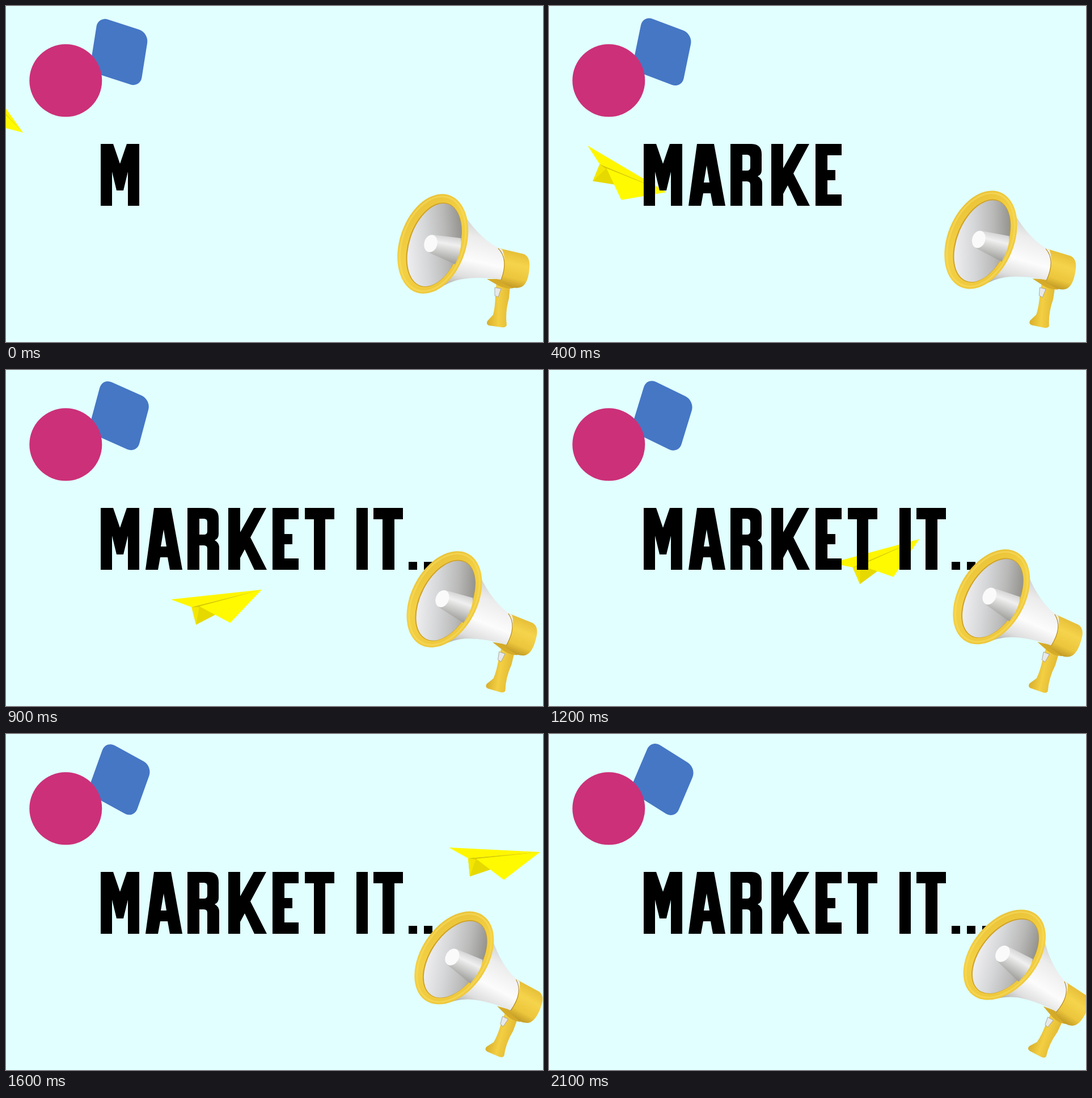
Animation, 947 px wide and 592 px high, one loop 2200 ms. Source, as an HTML page:

```html
<!DOCTYPE html>
<html lang="en">
<head>
<meta charset="utf-8">
<title>Market it...</title>
<style>
html, body { margin: 0; height: 100%; overflow: hidden; background: #e1ffff; }
svg { display: block; width: 100vw; height: 100vh; }
</style>
</head>
<body>
<svg viewBox="0 0 947 592">
  <defs>
    <linearGradient id="rim" x1="0" y1="0" x2="1" y2="1">
      <stop offset="0" stop-color="#e6bd33"/><stop offset=".45" stop-color="#f4d144"/><stop offset="1" stop-color="#ecc539"/>
    </linearGradient>
    <linearGradient id="bowl" x1=".1" y1=".8" x2=".9" y2=".2">
      <stop offset="0" stop-color="#eeeef1"/><stop offset=".35" stop-color="#d6d7d9"/><stop offset=".7" stop-color="#b9b9b8"/><stop offset="1" stop-color="#94938f"/>
    </linearGradient>
    <linearGradient id="tube" x1=".6" y1="0" x2=".4" y2="1">
      <stop offset="0" stop-color="#cecece"/><stop offset=".3" stop-color="#f0f0f0"/><stop offset=".65" stop-color="#c2c2c0"/><stop offset="1" stop-color="#92918d"/>
    </linearGradient>
    <linearGradient id="horn" x1=".6" y1="0" x2=".4" y2="1">
      <stop offset="0" stop-color="#c6c7c6"/><stop offset=".3" stop-color="#ececec"/><stop offset=".6" stop-color="#fcfcfc"/><stop offset=".82" stop-color="#dedede"/><stop offset="1" stop-color="#a9a9a6"/>
    </linearGradient>
    <linearGradient id="can" x1=".6" y1="0" x2=".4" y2="1">
      <stop offset="0" stop-color="#e2b730"/><stop offset=".4" stop-color="#f5d44c"/><stop offset=".75" stop-color="#ecc63c"/><stop offset="1" stop-color="#bd9522"/>
    </linearGradient>
    <linearGradient id="grip">
      <stop offset="0" stop-color="#d8ae2b"/><stop offset=".5" stop-color="#f3cf43"/><stop offset="1" stop-color="#e2ba33"/>
    </linearGradient>
  </defs>

  <rect id="tile" x="-46.5" y="-49" width="93" height="98" rx="18" fill="#4577c5"/>
  <circle cx="105.3" cy="131.3" r="64" fill="#cc3079"/>

  <!-- paper plane, nose at the origin -->
  <g id="plane">
    <path d="M-127 11-124 43-94 33 0 0z" fill="#e6d900"/>
    <path d="M-127 11-124 43-113 11z" fill="#f3e700"/>
    <path d="M-161-8 0 0-127 11z" fill="#fff600"/>
    <path d="M-127 11 0 0-113 13z" fill="#d9cb00"/>
    <path d="M-113 12 0 0-64 49z" fill="#fffa00"/>
  </g>

  <!-- condensed display lettering -->
  <g id="word" role="img" aria-label="MARKET IT..." fill-rule="evenodd">
    <path d="M167 352V243h22l12 35 12-35h22v109h-20V292l-8 33h-12l-8-33v60z"/>
    <path d="M246 352 261 243h30l20 109h-22l-4-22h-13l-4 22zM278 281l-5 30h10z"/>
    <path d="M320 243h36q19 0 19 18v28q0 8-7 11 8 4 8 13v39h-21v-37q0-6-6-6h-8v43h-21zM341 262v28h8q6 0 6-6v-16q0-6-6-6z"/>
    <path d="M392 243h21v43l24-43h22l-28 52 29 57h-22l-17-36-8 15v21h-21z"/>
    <path d="M470 243h46v20h-25v26h14v18h-14v25h25v20h-46z"/>
    <path d="M527 243h52v20h-16v89h-20v-89h-16z"/>
    <path d="M618 243h20v109h-20z"/>
    <path d="M648 243h52v20h-15v89h-21v-89h-16z"/>
    <path d="M710 338h15v14h-15z"/>
    <path d="M737 338h15v14h-15z"/>
    <path d="M764 338h15v14h-15z"/>
  </g>

  <g id="horn-group">
    <path d="M865 488 889 492 887 515Q880 540 883 562 882 567 874 566L852 563Q846 561 849 555L859 544Q863 530 863 505z" fill="url(#grip)"/>
    <path d="M862 496 873 498 868 513 862 510z" fill="#e8e8e8" stroke="#9c9c98" stroke-width=".8"/>
    <path d="M848 481 870 481 897 489 895 497Q880 500 862 489z" fill="#d6ab29"/>
    <path d="M866 426 913 437Q925 442 923 462 921 489 909 495 902 498 893 496L866 484z" fill="url(#can)"/>
    <path d="M806 365Q838 414 875 429 884 450 873 482 831 476 800 482 780 486 757 502z" fill="url(#horn)"/>
    <path d="M868 427Q887 446 873 483" fill="none" stroke="#b78f26" stroke-width="1.2"/>
    <g transform="translate(752.7 419) rotate(18.7)">
      <ellipse rx="58.5" ry="90.5" fill="url(#rim)"/>
      <ellipse rx="54" ry="86" fill="none" stroke="#f9df68" stroke-width="3" opacity=".5"/>
      <ellipse cx="2.5" cy="1" rx="45" ry="77" fill="#cfa226"/>
    </g>
    <ellipse rx="43.7" ry="75.7" transform="translate(755.5 421) rotate(18.7)" fill="url(#bowl)"/>
    <path d="M752 403 802 409Q805 428 792 455L745 434z" fill="url(#tube)"/>
    <ellipse rx="11.5" ry="15.5" transform="translate(749 418.5) rotate(14)" fill="#fafafa"/>
  </g>
</svg>
<script>
const LOOP = 2200, STEP = 100, LAST = LOOP - STEP;
const $ = id => document.getElementById(id);
const letters = [...$('word').children];

// time, nose x, nose y, heading
const flight = [
  [0, 30, 223, 55], [400, 207, 328, 30.7], [600, 291, 364, 19.1],
  [900, 451, 387, -6], [1200, 653, 298, -15], [1600, 942, 208, 3], [2100, 1320, 215, 15]
];

function slope(i, c) {
  const a = flight[Math.max(i - 1, 0)], b = flight[Math.min(i + 1, flight.length - 1)];
  return (b[c] - a[c]) / (b[0] - a[0]);
}

// Smooth Hermite curve through the flight points
function along(t, c) {
  let i = 0;
  while (i < flight.length - 2 && t >= flight[i + 1][0]) i++;
  const a = flight[i], b = flight[i + 1], d = b[0] - a[0], u = (t - a[0]) / d, v = 1 - u;
  return v * v * (1 + 2 * u) * a[c] + u * u * (3 - 2 * u) * b[c]
    + d * u * v * (v * slope(i, c) - u * slope(i + 1, c));
}

const pose = (id, value) => $(id).setAttribute('transform', value);

function draw(now) {
  const t = Math.floor(now % LOOP / STEP) * STEP, p = t / LAST;
  letters.forEach((el, i) => el.style.display = i <= t / STEP ? '' : 'none');
  pose('plane', `translate(${along(t, 1)} ${along(t, 2)}) rotate(${along(t, 3) - 3})`);
  pose('tile', `translate(${199.5 + 1.5 * p} ${81 - p}) rotate(${9 + 14 * p}) skewY(9)`);
  pose('horn-group', `translate(0 ${p}) rotate(${20 * p} 866 547)`);
}

const start = performance.now();
function tick() {
  draw(performance.now() - start);
  requestAnimationFrame(tick);
}
tick();
</script>
</body>
</html>
```
